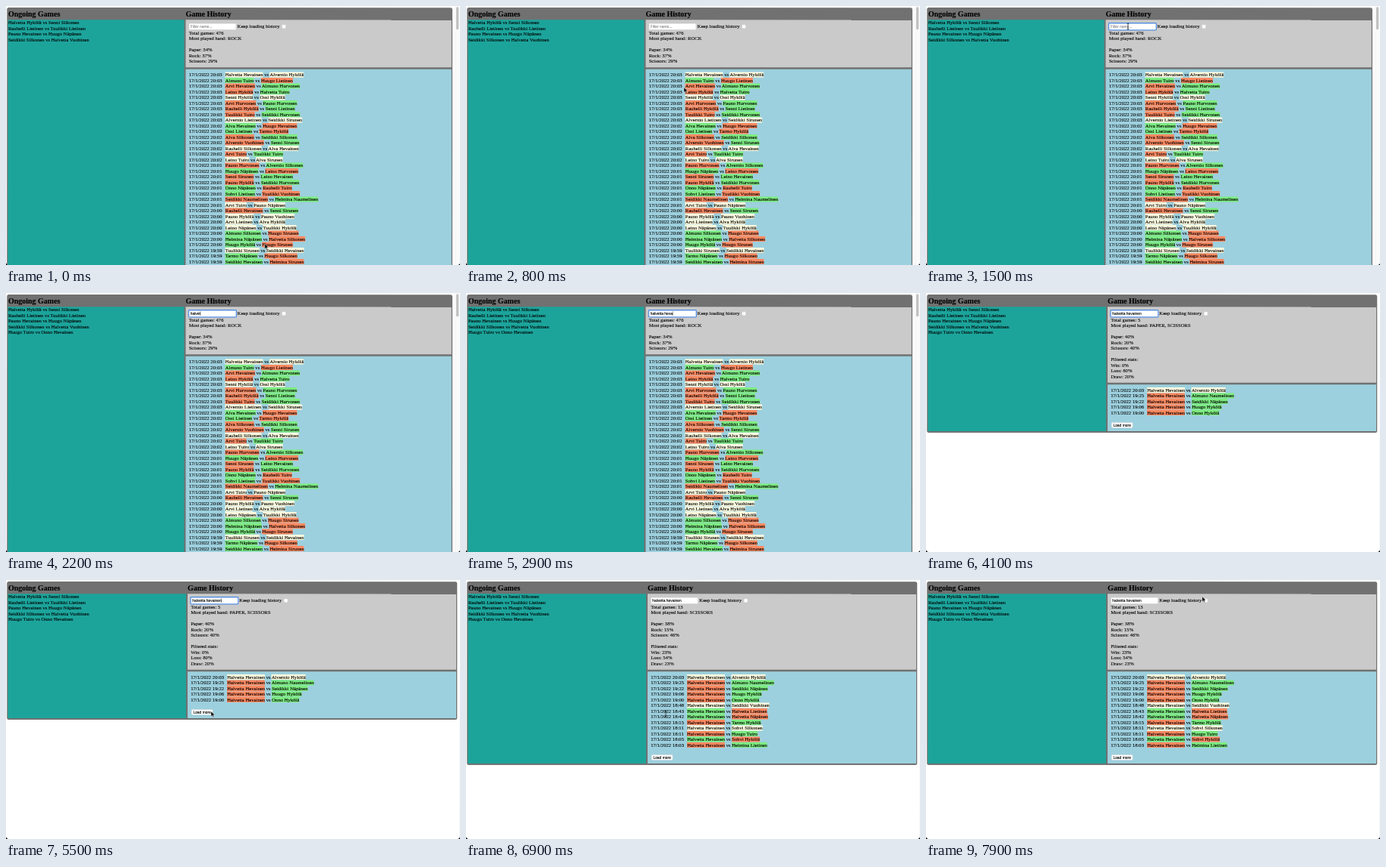
Write an HTML page that moves like this. It is 600 px wide and 343 px high and loops after 8000 ms.

```html
<!DOCTYPE html>
<html lang="en">
<head>
<meta charset="utf-8">
<title>Game History</title>
<style>
  html, body { margin: 0; width: 100%; height: 100%; overflow: hidden; background: #000; }
  /* the tiny rotation turns glyph hinting off, so small text keeps its true shape */
  #view {
    --w: 1425px;
    position: absolute; left: 0; top: 0; width: 1440px; height: 823.2px;
    overflow: hidden; background: #fff; color: #000;
    border-radius: 0 0 9px 9px;
    transform: scale(.4166667) rotate(.005deg); transform-origin: 0 0;
    font: 16px/18px "Liberation Serif", "Times New Roman", serif;
    -webkit-text-stroke: .25px;
    white-space: nowrap;
  }
  #view.filtered { --w: 1440px; }
  #page {
    position: absolute; left: 3px; top: 5px; width: calc(var(--w) - 12px);
    padding-bottom: 5px; background: #717171; border-radius: 6px;
  }
  h2 { position: absolute; top: 6px; left: 4px; margin: 0; font-size: 24px; line-height: 28px; }
  #ongoing {
    position: absolute; left: 3px; top: 39px; bottom: 5px;
    width: calc(var(--w) * .4 - 11px); background: #1ca49b;
  }
  #ongoing div { padding-left: 1px; }
  #right { margin-left: calc(var(--w) * .4 - 3px); margin-right: 3px; padding-top: 39px; }
  #right h2 { left: calc(var(--w) * .4 - 3px); }
  #stats { position: relative; padding: 33px 10px 10px; background: #cacaca; }
  #lines { white-space: pre; }
  #field {
    position: absolute; left: 10px; top: 11px; width: 150px; height: 21px;
    box-sizing: border-box; padding-left: 4px; background: #fff;
    border: 1px solid #b4b4b4; line-height: 19px;
  }
  #field, button { font-family: "Liberation Sans", Arial, sans-serif; font-size: 11.8px; }
  #field.empty { color: #8a8a8a; }
  #field.focus { border-color: #4a86dc; border-radius: 2px; box-shadow: 0 0 0 2px #4a8be6; }
  #caret { display: inline-block; width: 1px; height: 14px; background: #000; vertical-align: -3px; }
  #label { position: absolute; left: 164px; top: 12px; }
  #box {
    position: absolute; left: 305px; top: 15px; width: 13px; height: 13px;
    box-sizing: border-box; background: #fff; border: 1px solid #c0c0c0; border-radius: 3px;
  }
  #list { margin-top: 6px; padding: 9px 10px 10px; background: #9dd0de; min-height: 700px; }
  .filtered #list { min-height: 0; }
  time { margin-right: 10px; }
  .win { background: #7dec80; }
  .loss { background: #ff8a61; }
  .draw { background: #fffce0; }
  button {
    display: block; margin: 21px 0 0 2px; width: 68px; height: 18px; padding: 0;
    border: 1px solid #d2d2d2; border-radius: 4px; background: #fff; color: #000; line-height: 16px;
  }
  #bar {
    position: absolute; right: 0; top: 0; width: 14px; height: 100%;
    background: #fafafa; border-left: 1px solid #e8e8e8;
  }
  #bar::after {
    content: ""; position: absolute; left: 2px; top: 3px; width: 8px; height: 72px;
    border-radius: 4px; background: #c1c1c1;
  }
  .filtered #bar { display: none; }
  #mouse { position: absolute; left: 0; top: 0; width: 24px; height: 24px; overflow: visible; }
</style>
</head>
<body>
<div id="view">
  <div id="page">
    <h2>Ongoing Games</h2>
    <div id="ongoing">
      <div>Halvetta Hykölä vs Senni Silkonen</div>
      <div>Rauhelli Lietinen vs Tuulikki Lietinen</div>
      <div>Pauno Hevainen vs Huugo Näpänen</div>
      <div>Seidikki Silkonen vs Halvetta Vuohinen</div>
      <div id="fresh">Huugo Tuiro vs Onno Hevainen</div>
    </div>
    <div id="right">
      <h2>Game History</h2>
      <div id="stats">
        <div id="field"><span id="value"></span><span id="caret"></span></div>
        <span id="label">Keep loading history</span><span id="box"></span>
        <div id="lines"></div>
      </div>
      <div id="list"></div>
    </div>
  </div>
  <div id="bar"></div>
  <svg id="mouse">
    <path id="arrow" d="M0 0V16L4 12.6 6.6 18.4 9.2 17.2 6.7 11.6H11.8Z" fill="#000" stroke="#fff"/>
    <path id="beam" d="M-3-10Q0-10 0-7Q0-10 3-10M0-8V8M-3 10Q0 10 0 7Q0 10 3 10" fill="none" stroke="#000" stroke-width="1.5"/>
  </svg>
</div>
<script>
const LOOP = 8000, FOCUS = 1300, TYPE = 1700, KEY = 100, NEW_GAME = 1900, FILTER = 3800, MORE = 6700;
const QUERY = 'halvetta hevainen';
const TYPED = TYPE + KEY * (QUERY.length - 1);
const $ = id => document.getElementById(id);

// ">" first player won, "<" lost, "=" draw
const recent = `20:03 Halvetta Hevainen = Alvernio Hykölä
20:03 Almuno Tuiro > Huugo Lietinen
20:03 Arvi Hevainen < Almuno Hurvonen
20:03 Leino Hykölä < Halvetta Tuiro
20:03 Senni Hykölä = Ossi Hykölä
20:03 Arvi Hurvonen < Pauno Hurvonen
20:03 Rauhelli Hykölä < Senni Lietinen
20:03 Tuulikki Tuiro < Seidikki Hurvonen
20:03 Alvernio Lietinen = Seidikki Sirunen
20:02 Alva Hevainen > Huugo Hevainen
20:02 Ossi Lietinen > Tarmo Hykölä
20:02 Alva Silkonen < Seidikki Silkonen
20:02 Alvernio Vuohinen < Senni Sirunen
20:02 Rauhelli Silkonen = Alva Hevainen
20:02 Arvi Tuiro < Tuulikki Tuiro
20:02 Leino Tuiro = Alva Sirunen
20:01 Pauno Hurvonen < Alvernio Silkonen
20:01 Huugo Näpänen > Leino Hurvonen
20:01 Senni Sirunen < Leino Hevainen
20:01 Pauno Hykölä < Seidikki Hurvonen
20:01 Onno Näpänen > Rauhelli Tuiro
20:01 Sohvi Lietinen > Tuulikki Vuohinen
20:01 Seidikki Naumelinen < Helmina Naumelinen
20:01 Arvi Tuiro = Pauno Näpänen
20:00 Rauhelli Hevainen < Senni Sirunen
20:00 Pauno Hykölä = Pauno Vuohinen
20:00 Arvi Lietinen = Alva Hykölä
20:00 Leino Näpänen = Tuulikki Hykölä
20:00 Almuno Silkonen > Huugo Sirunen
20:00 Helmina Näpänen > Halvetta Silkonen
20:00 Huugo Hykölä > Huugo Sirunen
19:59 Tuulikki Sirunen = Seidikki Hevainen
19:59 Tarmo Näpänen > Huugo Silkonen
19:59 Seidikki Hevainen > Helmina Sirunen`.split('\n');

const found = `20:03 = Alvernio Hykölä
19:25 < Almuno Naumelinen
19:22 < Seidikki Näpänen
19:06 < Huugo Hykölä
19:00 < Onno Hykölä
18:48 = Seidikki Vuohinen
18:43 > Halvetta Lietinen
18:42 > Halvetta Näpänen
18:15 < Tarmo Hykölä
18:11 = Sohvi Silkonen
18:11 < Huugo Tuiro
18:05 > Sohvi Hykölä
18:03 < Helmina Lietinen`.split('\n').map(r => r.slice(0, 6) + 'Halvetta Hevainen' + r.slice(5));

const stages = [
  { games: recent, total: 476, hand: 'ROCK', hands: [34, 37, 29] },
  { games: found.slice(0, 5), total: 5, hand: 'PAPER, SCISSORS', hands: [40, 20, 40], own: [0, 80, 20] },
  { games: found, total: 13, hand: 'SCISSORS', hands: [38, 15, 46], own: [23, 54, 23] }
];

const tags = { '>': ['win', 'loss'], '<': ['loss', 'win'], '=': ['draw', 'draw'] };

function row(game) {
  const [, time, a, sign, b] = game.match(/^(\S+) (.+) ([<>=]) (.+)$/);
  const [ta, tb] = tags[sign];
  return `<div><time>17/1/2022 ${time}</time><span class="${ta}">${a}</span> vs <span class="${tb}">${b}</span></div>`;
}

const percents = (names, values) => names.map((n, i) => `${n}: ${values[i]}%`);

function render(n) {
  const s = stages[n];
  const lines = [`Total games: ${s.total}`, `Most played hand: ${s.hand}`, '',
    ...percents(['Paper', 'Rock', 'Scissors'], s.hands)];
  if (s.own) lines.push('', 'Filtered stats:', ...percents(['Win', 'Loss', 'Draw'], s.own));
  $('lines').innerHTML = lines.map(l => `<div>${l || ' '}</div>`).join('');
  $('list').innerHTML = s.games.map(row).join('') + (n ? '<button>Load more</button>' : '');
  $('view').className = n ? 'filtered' : '';
}

// pointer stops: time, x, y
const path = [[0, 342, 315], [150, 342, 315], [1150, 267, 27], [4400, 267, 27], [5300, 271, 174],
  [6500, 271, 174], [6900, 264, 177], [7050, 264, 177], [7750, 365, 22], [LOOP, 365, 22]];

function pointer(t) {
  const i = path.findIndex(p => p[0] > t);
  const [t0, x0, y0] = path[i - 1], [t1, x1, y1] = path[i];
  const k = (t - t0) / (t1 - t0), e = k * k * (3 - 2 * k);
  return [x0 + (x1 - x0) * e, y0 + (y1 - y0) * e];
}

const show = (id, on) => { $(id).style.display = on ? '' : 'none'; };

let stage = -1;
function draw(t) {
  const n = t < FILTER ? 0 : t < MORE ? 1 : 2;
  if (n !== stage) render(stage = n);

  const count = Math.max(0, Math.min(QUERY.length, Math.floor((t - TYPE) / KEY) + 1));
  const focus = t >= FOCUS && t < MORE;
  const since = t - (t < TYPE ? FOCUS : TYPED);
  const value = count ? QUERY.slice(0, count) : 'Filter name...';
  if ($('value').textContent !== value) $('value').textContent = value;
  $('field').className = (count ? '' : 'empty ') + (focus ? 'focus' : '');
  show('caret', focus && count && (since < 0 || since % 1000 < 500));
  show('fresh', t >= NEW_GAME);

  const [x, y] = pointer(t);
  const beam = t > 1080 && t < 4480 || t > MORE && t < 7150;
  show('mouse', t < TYPE || t > 4400);
  show('beam', beam);
  show('arrow', !beam);
  $('mouse').style.transform = `translate(${x * 2.4}px, ${y * 2.4}px)`;
}

const start = performance.now();
function tick() {
  draw((performance.now() - start) % LOOP);
  requestAnimationFrame(tick);
}
tick();
</script>
</body>
</html>
```
